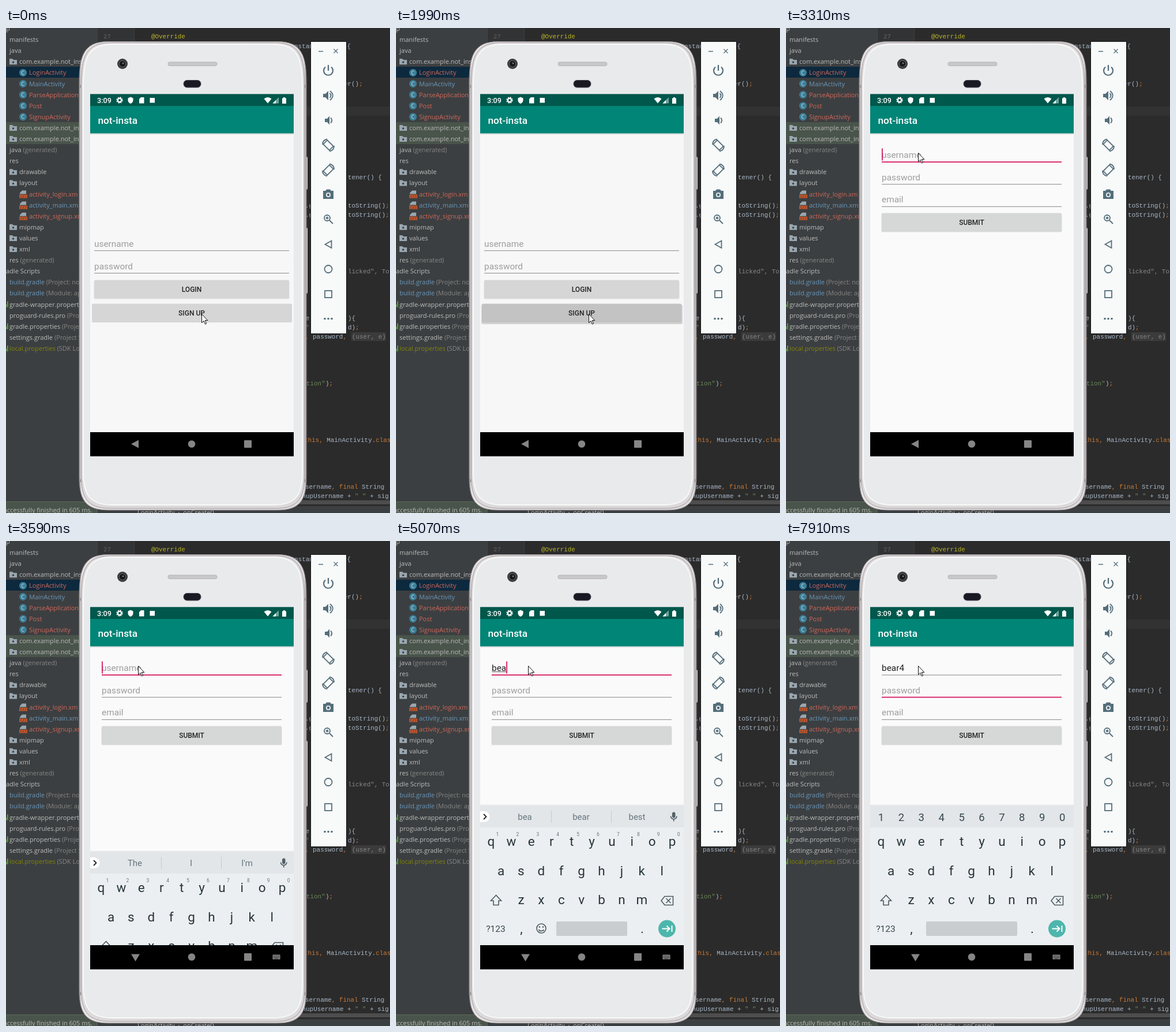
Recreate the animation shown at these times as an HTML page. Size 666 px wide and 840 px high, loop 8 s.

```html
<!DOCTYPE html>
<html lang="en">
<head>
<meta charset="utf-8">
<title>Sign-up demo</title>
<style>
html, body { margin: 0; width: 100%; height: 100%; overflow: hidden; background: #2b2b2b; }
svg { display: block; }
text { white-space: pre; }
#tree, .ide { font: 11px "Open Sans", "Noto Sans", sans-serif; fill: #bbb; }
#code { font: 10.9px "Liberation Mono", monospace; fill: #a9b7c6; }
.key { fill: #cc7832; } .str { fill: #6a8759; } .gray { fill: #868686; }
.red { fill: #d1675a; } .blue { fill: #6897bb; } .olive { fill: #848504; }
.app { font-family: Roboto, sans-serif; }
.title { font-size: 17.2px; font-weight: 500; fill: #fff; }
.edit { font-size: 15.4px; fill: #212121; }
.hint { font-size: 15.4px; fill: #9d9d9d; }
.btn { font-size: 12px; font-weight: 500; fill: #222; text-anchor: middle; }
.line { fill: #9a9a9a; }
.pink { fill: #d81b60; }
.c { text-anchor: middle; }
.letter { font-size: 22.5px; fill: #26343b; }
.digit { font-size: 18.5px; fill: #37474f; }
.mini { font-size: 8.5px; fill: #66757d; }
.word { font-size: 15px; fill: #66757d; }
.tool { fill: none; stroke: #546e7a; stroke-width: 1.8; }
.solid { fill: #546e7a; }
.ink { fill: none; stroke: #4b5a62; stroke-width: 1.6; }
</style>
</head>
<body>
<svg width="666" height="840" viewBox="0 0 666 840">
  <defs>
    <clipPath id="screenClip"><rect x="146" y="114.5" width="353" height="627"/></clipPath>
    <clipPath id="reveal"><rect id="edge" x="146" y="114" width="353" height="640"/></clipPath>
    <clipPath id="boardClip"><rect x="146" y="440" width="353" height="260"/></clipPath>
    <g id="chrome">
      <rect x="146" y="114" width="353" height="21" fill="#00574b"/>
      <rect x="146" y="135" width="353" height="47.500" fill="#008577"/>
      <rect x="146" y="182.500" width="353" height="2" fill="#000" opacity=".1"/>
      <text class="app title" x="159.500" y="165.500">not-insta</text>
      <rect x="146" y="700" width="353" height="60"/>
    </g>
    <linearGradient id="rim">
      <stop offset="0" stop-color="#aaa4a6"/><stop offset=".01" stop-color="#e6e3e4"/>
      <stop offset=".99" stop-color="#dedbdc"/><stop offset="1" stop-color="#9b9597"/>
    </linearGradient>
  </defs>

  <!-- editor behind the phone -->
  <rect width="158" height="840" fill="#3c3f41"/>
  <rect x="158" width="64" height="840" fill="#313335"/>
  <path d="M158.500 0V840M222.500 0V840" stroke="#4a4c4e" opacity=".6"/>
  <rect x="222" y="136" width="444" height="16" fill="#323232"/>
  <rect x="599" y="527" width="60" height="15" fill="#3b3b3b"/>
  <g id="tree"></g>
  <g id="code"></g>
  <rect x="222" y="818" width="444" height="7" fill="#4d4d4d"/>
  <rect x="158" y="828" width="508" height="12" fill="#3c3f41"/>
  <text class="ide" x="228" y="843">LoginActivity  ›  onCreate()</text>
  <rect x="-2" y="820.500" width="160" height="24" fill="#49544a" stroke="#5d6a5c"/>
  <text class="ide" x="-5" y="839">uccessfully finished in 605 ms.</text>

  <!-- phone body -->
  <rect x="518" y="223" width="5" height="57" rx="2" fill="#dedede"/>
  <rect x="518" y="346" width="5" height="114" rx="2" fill="#dedede"/>
  <path id="shell" fill="url(#rim)" stroke="#8f898b"/>
  <path d="M127 101h8M513 101h8M127 784h8M513 784h8" stroke="#a09a9c" stroke-width="5"/>
  <path id="band" fill="#dcd9da" stroke="#a39b9e"/>
  <path id="face" fill="#e9eaec" stroke="#f9f9f9" stroke-width="2"/>
  <circle cx="202" cy="62" r="9" fill="#3b3b3d"/>
  <circle cx="202" cy="62" r="5.500" fill="#17171a" stroke="#66666a"/>
  <circle cx="203" cy="61" r="1.500" fill="#777d88"/>
  <rect x="281" y="59" width="85" height="6.500" rx="3" fill="#c8c8ca" stroke="#aaa" stroke-width=".7"/>
  <rect x="308" y="90.500" width="30" height="12.500" rx="6" fill="#191923" stroke="#4c4c58"/>

  <!-- phone screen -->
  <g clip-path="url(#screenClip)" class="app">
    <rect x="146" y="114" width="353" height="628"/>
    <g id="login">
      <rect x="146" y="114" width="353" height="626" fill="#f7f7f7"/>
      <use href="#chrome"/>
      <text class="hint" x="153" y="379">username</text>
      <rect class="line" x="153" y="385" width="338" height="1.200"/>
      <text class="hint" x="153" y="417.500">password</text>
      <rect class="line" x="153" y="424" width="338" height="1.200"/>
      <rect x="152.500" y="438" width="339" height="31.500" rx="2" fill="#000" opacity=".1"/>
      <rect x="153" y="436.500" width="338" height="31.500" rx="2" fill="#d6d6d6"/>
      <text class="btn" x="322" y="456.500">LOGIN</text>
      <rect id="pressShade" x="148" y="479" width="349" height="34" rx="3" fill="#000" opacity=".15"/>
      <rect id="signUp" x="149" y="477.500" width="347" height="32.500" rx="2"/>
      <text class="btn" x="322" y="497.500">SIGN UP</text>
      <rect id="dim" x="146" y="114" width="353" height="640"/>
    </g>
    <g id="signupClip" clip-path="url(#reveal)"><g id="signup">
      <rect x="146" y="114" width="353" height="626" fill="#fafafa"/>
      <use href="#chrome"/>
      <text id="nameHint" class="hint" x="166" y="225">username</text>
      <text id="name" class="edit" x="166" y="225"></text>
      <rect id="compose" x="166.500" y="226" height="1" fill="#555"/>
      <rect id="nameLine" x="166" width="312"/>
      <text class="hint" x="166" y="263.500">password</text>
      <rect id="passLine" x="166" width="312"/>
      <text class="hint" x="166" y="302">email</text>
      <rect class="line" x="166" y="308.800" width="312" height="1.200"/>
      <rect x="165.500" y="322" width="313" height="31.500" rx="2" fill="#000" opacity=".13"/>
      <rect x="166" y="320.500" width="312" height="31.500" rx="2" fill="#d6d7d7"/>
      <text class="btn" x="322" y="341">SUBMIT</text>
      <rect id="caret" class="pink" width="1.800" height="21"/>
    </g></g>

    <g clip-path="url(#boardClip)"><g id="board">
      <rect x="146" y="456.500" width="353" height="2" fill="#000" opacity=".06"/>
      <rect x="146" y="458" width="353" height="243" fill="#eceff1"/>
      <rect x="146" y="458" width="353" height="38" fill="#e2e6e9"/>
      <g id="letters"></g>
      <path class="ink" d="M173.500 613.500L164.500 623H169V630.500H178V623H182.500Z"/>
      <path class="ink" d="M466 615.500H480.500V630.500H466L460 623ZM468.500 619l8 8m0-8l-8 8"/>
      <text class="c" x="173" y="677" font-size="15.500" fill="#37474f">?123</text>
      <text class="c letter" x="217.500" y="679">,</text>
      <text class="c letter" x="427" y="679">.</text>
      <rect id="space" y="659" height="25" rx="2" fill="#c9cdd0"/>
      <circle cx="470" cy="671.500" r="15" fill="#4db6ac"/>
      <path d="M461.500 671.500H474M469.500 666.500l5 5-5 5M478.500 666V677" fill="none" stroke="#fff" stroke-width="2"/>
      <g id="words">
        <path d="M146 468H153a9.500 9.500 0 0 1 0 19H146Z" fill="#fff"/>
        <path d="M152 473l4.500 4.500-4.500 4.500" fill="none" stroke="#222" stroke-width="1.800"/>
        <path d="M269.500 467V488M373.500 467V488" stroke="#c3c9cc"/>
        <text class="c word" x="223.500" y="483"></text>
        <text class="c word" x="321" y="483"></text>
        <text class="c word" x="418" y="483"></text>
        <rect x="479" y="469.500" width="5.500" height="10" rx="2.700" fill="#546067"/>
        <path class="ink" d="M476.500 476.500a5.200 5.200 0 0 0 10.400 0M481.700 482V485.500"/>
        <circle class="ink" cx="252" cy="671" r="8"/>
        <path class="ink" d="M247.500 673a5 4.500 0 0 0 9 0"/>
        <circle cx="249" cy="668.500" r="1.300" fill="#4b5a62"/><circle cx="255" cy="668.500" r="1.300" fill="#4b5a62"/>
        <g id="minis"></g>
      </g>
      <g id="digits"></g>
    </g></g>

    <!-- system icons -->
    <text x="158" y="129.500" font-size="12.600" font-weight="500" fill="#fff">3:09</text>
    <circle cx="197" cy="125" r="3.200" fill="none" stroke="#fff" stroke-width="2.200"/>
    <circle cx="197" cy="125" r="4.900" fill="none" stroke="#fff" stroke-width="1.600" stroke-dasharray="2.200 1.650"/>
    <path d="M216 119.500l4.500 2V125q0 4-4.500 6-4.500-2-4.500-6V121.500ZM234 120h5.500v10.500h-8.500V123Z" fill="#fff"/>
    <rect x="249.500" y="121" width="8.500" height="8.500" fill="#fff"/>
    <path d="M447.500 122.500q6.500-5 13 0L454 130.500ZM486 121.500V131H479V121.500H481V120H484V121.500Z" fill="#fff"/>
    <path d="M473 120V130.500H462.500Z" fill="#fff" opacity=".45"/>
    <path d="M468 125V130.500H462.500Z" fill="#fff"/>
    <path id="back" fill="#858585"/>
    <circle cx="322" cy="720.500" r="6.300" fill="#858585"/>
    <rect x="413" y="714" width="13" height="13" rx="1" fill="#858585"/>
    <g id="boardIcon">
      <rect x="462.500" y="716.500" width="13" height="8" fill="#858585"/>
      <path d="M464 719h10M464 721.300h10M466 723.300h6" stroke="#000" stroke-dasharray="1.200 1"/>
    </g>
  </g>

  <!-- emulator toolbar -->
  <rect x="528.500" y="23.500" width="62" height="506" fill="#f8f9f9" stroke="#151515"/>
  <g class="tool">
    <path d="M542 40.500H550M568.500 36.500l7 7m0-7l-7 7" stroke-width="1.300"/>
    <path d="M554 67.500a8 8 0 1 0 10 0M559 64V74" stroke-width="2.200"/>
    <path d="M561.500 113q4 4 0 8M562 109q9.500 8 0 16"/>
    <path d="M563 155.500q4.500 4.500 0 9"/>
    <g id="turn">
      <rect x="551.500" y="198" width="15" height="10" transform="rotate(45 559 203)"/>
      <path d="M549 202q0-8 8-9.500M569 204q0 8-8 9.500"/>
    </g>
    <use href="#turn" transform="matrix(-1 0 0 1 1118 43)"/>
    <circle cx="557" cy="329" r="5"/>
    <path d="M561 333l6 6M554.500 329h5M557 326.500v5"/>
    <path d="M564.500 368.500V381L553.500 374.800Z"/>
    <circle cx="559" cy="417.500" r="6.500"/>
    <rect x="553" y="455" width="12" height="12"/>
  </g>
  <g class="solid">
    <path d="M550 114h4l5-5v16l-5-5h-4ZM553 157h4l4-4.500v15l-4-4.500h-4Z"/>
    <path d="M550 282h4l2-2.500h6l2 2.500h4v14h-18Z"/>
    <circle cx="559" cy="289" r="4" fill="#f8f9f9"/><circle cx="559" cy="289" r="2.400"/>
    <circle cx="553" cy="503.500" r="1.800"/><circle cx="559" cy="503.500" r="1.800"/><circle cx="565" cy="503.500" r="1.800"/>
  </g>

  <path id="mouse" d="M.5.5V15.500L4 12.300 6.500 18 8.600 17 6.200 11.500H10.800Z" fill="#fff" stroke="#111"/>
</svg>

<script>
const $ = id => document.getElementById(id);
const LOOP = 8000;
const set = (id, attrs) => { for (const k in attrs) $(id).setAttribute(k, attrs[k]); };

// phone outline with soft, squarish corners
const outline = (l, t, r, b) =>
  `M${l} ${t + 72}C${l} ${t + 26} ${l + 7} ${t} ${l + 50} ${t}H${r - 50}C${r - 7} ${t} ${r} ${t + 26} ${r} ${t + 72}` +
  `V${b - 58}C${r} ${b - 20} ${r - 9} ${b} ${r - 50} ${b}H${l + 50}C${l + 9} ${b} ${l} ${b - 20} ${l} ${b - 58}Z`;
set('shell', { d: outline(127, 23.5, 521, 835) });
set('band', { d: outline(130.5, 25.5, 517.5, 832) });
set('face', { d: outline(134, 28, 514, 826) });

// project tree: x, label, colour, grey suffix, icon
const rows = [
  [0, 'p'], [6, 'manifests'], [6, 'java'],
  [23, 'com.example.not_insta', '', '', 'folder'],
  [40, 'LoginActivity', 'red', '', 'class'], [40, 'MainActivity', 'blue', '', 'class'],
  [40, 'ParseApplication', 'red', '', 'class'], [40, 'Post', 'red', '', 'class'],
  [40, 'SignupActivity', 'red', '', 'class'],
  [23, 'com.example.not_in', '', '', 'folder'], [23, 'com.example.not_in', '', '', 'folder'],
  [6, 'java', '', ' (generated)'], [6, 'res'],
  [23, 'drawable', '', '', 'folder'], [23, 'layout', '', '', 'folder'],
  [40, 'activity_login.xm', 'red', '', 'xml'], [40, 'activity_main.xm', 'blue', '', 'xml'],
  [40, 'activity_signup.xm', 'red', '', 'xml'],
  [23, 'mipmap', '', '', 'folder'], [23, 'values', '', '', 'folder'], [23, 'xml', '', '', 'folder'],
  [6, 'res', '', ' (generated)'], [0, 'adle Scripts'],
  [6, 'build.gradle', 'blue', ' (Project: no'], [6, 'build.gradle', 'blue', ' (Module: ap'],
  [6, 'gradle-wrapper.properti', '', '', 'bar'], [6, 'proguard-rules.pro', '', ' (Pro'],
  [6, 'gradle.properties', '', ' (Projec', 'bar'], [6, 'settings.gradle', '', ' (Project S'],
  [6, 'local.properties', 'olive', ' (SDK Lo', 'bar']
];
const icons = {
  folder: '<path d="M6-5h5l2 2h6V5H6Z" fill="#9aa7b0"/><circle cx="12.500" cy="1" r="1.700" fill="#3c3f41"/>',
  class: '<circle cx="29.500" r="6.500" fill="#3d7f98"/><text x="26.200" y="3.500" font-size="9" fill="#d5e4ea">C</text>',
  xml: '<path d="M28-6h7V0H24V-2Z" fill="#9aa7b0"/><path d="M23 1H37V7H23Z" fill="#c4572b"/>' +
    '<path d="M27 2l-2 2 2 2M33 2l2 2-2 2M31 2l-2 4" fill="none" stroke="#3c3f41"/>',
  bar: '<path d="M0 0h1v5h-1ZM2-5h1.500V5h-1.500Z" fill="#62b543"/>'
};
$('tree').innerHTML =
  '<rect y="67" width="158" height="19" fill="#0d293e"/><rect y="163" width="158" height="38" fill="#49544a"/>' +
  rows.map(([x, label, color = '', note = '', icon], i) =>
    `<g transform="translate(0 ${(1 + i * 19.1).toFixed(1)})">${icons[icon] || ''}` +
    `<text x="${x}" y="4" class="${color}">${label}<tspan class="gray">${note}</tspan></text></g>`).join('');

const paint = s => s.replace(/"[^"]*"?|[;,]|\b(final|this|class)\b/g,
  m => `<tspan class="${m[0] === '"' ? 'str' : 'key'}">${m}</tspan>`);
const code = [
  [487, 31, 'dInstanceState) {'], [586, 96, 'er();'], [593, 258, 'tener() {'],
  [519, 307, '.getText().'], [593, 307, 'toString();'], [519, 323, '.getText().'], [593, 323, 'toString();'],
  [513, 502, 'ne'], [593, 502, '){'], [519, 518, '"'], [593, 518, 'd);'], [519, 534, ', password,'],
  [554, 615, ');'], [517, 713, 'this, MainActivity.class'],
  [519, 794, 'sername, final String'], [507, 810, 'gnupUsername + " " + sig']
];
$('code').innerHTML = code.map(([x, y, s]) => `<text x="${x}" y="${y + 4}">${paint(s)}</text>`).join('') +
  '<text x="169" y="18" fill="#606366">27</text><text x="252" y="18" fill="#bbb529">@Override</text>' +
  '<text class="gray" x="593" y="425">licked", To</text><text class="gray" x="600" y="538">(user, e)</text>' +
  '<text class="str" x="521" y="619">tion"</text>';

// keyboard
const keyRow = (chars, x, y, cls) => [...chars].map((ch, i) =>
  `<text class="c ${cls}" x="${(x + i * 34.9).toFixed(1)}" y="${y}">${ch}</text>`).join('');
$('letters').innerHTML = keyRow('qwertyuiop', 165, 528, 'letter') +
  keyRow('asdfghjkl', 182, 579, 'letter') + keyRow('zxcvbnm', 217, 629, 'letter');
$('minis').innerHTML = keyRow('1234567890', 176, 511, 'mini');
$('digits').innerHTML = keyRow('1234567890', 165, 484.5, 'digit');

// timelines: [start ms, value...]
const mouse = [[0, 339, 495], [120, 336, 495], [240, 334, 495], [2410, 329, 487], [2560, 314, 452],
  [2680, 306, 424], [2830, 284, 358], [2950, 260, 298], [3070, 240, 246], [3190, 230, 218], [3310, 229, 216]];
const slide = [[0, 0, 0, 26, 760], [2410, 4, .05, 21, 420], [2560, 8, .12, 9, 172], [2680, 8, .12, 1, 114], [2830, 8, .12, 0, 114]];
const typing = [[0, '', 'The', 'I', "I'm"], [4240, 'b', 'b', 'be', 'I'], [4670, 'be', 'be', 'bed', 'bet'],
  [5070, 'bea', 'bea', 'bear', 'best'], [5470, 'bear', 'bear', 'bearings', 'bears'], [6580, 'bear4', 'bear4', 'bear 4', 'bear']];
const blink = [[0, 0], [3310, 1], [5900, 0], [6430, 1], [6980, 0], [7500, 1], [7910, 0]];

const pick = (steps, t) => steps.filter(s => s[0] <= t).pop().slice(1);
const show = (id, on) => $(id).style.display = on ? '' : 'none';
const shift = (id, y, x = 0) => set(id, { transform: `translate(${x} ${y})` });
const underline = (id, y, active) => set(id, {
  class: active ? 'pink' : 'line', y: active ? y - .3 : y, height: active ? 1.8 : 1.2
});
const words = document.querySelectorAll('#words .word');

function draw(t) {
  const [mx, my] = pick(mouse, t);
  shift('mouse', my, mx);

  const pressed = t >= 1990;
  show('pressShade', pressed);
  set('signUp', { fill: pressed ? '#c3c3c3' : '#d6d6d6', width: pressed ? 346 : 347 });

  const [up, dim, down, edge] = pick(slide, t);
  shift('login', -up);
  set('dim', { opacity: dim });
  shift('signup', down);
  set('edge', { y: edge });
  show('signupClip', t >= 2410);

  const [typed, ...hints] = pick(typing, t);
  const onPass = t >= 7380;
  $('name').textContent = typed;
  const width = typed ? $('name').getComputedTextLength() : 0;
  show('nameHint', !typed);
  set('compose', { width: onPass ? 0 : width });
  underline('nameLine', 231.5, t >= 3310 && !onPass);
  underline('passLine', 270, onPass);
  show('caret', pick(blink, t)[0]);
  set('caret', { x: onPass ? 166 : 166 + width, y: onPass ? 247.5 : 208.5 });

  const boardUp = t >= 3590, numeric = t >= 7500;
  show('board', boardUp);
  shift('board', t < 3720 ? 80 : 0);
  show('words', !numeric);
  show('digits', numeric);
  set('space', numeric ? { x: 243, width: 158 } : { x: 278, width: 123 });
  words.forEach((w, i) => w.textContent = hints[i]);
  show('boardIcon', boardUp);
  set('back', { d: boardUp ? 'M217 715.500H232L224.500 728Z' : 'M230 713.500V727.500L217 720.500Z' });
}

const start = performance.now();
function tick() {
  draw((performance.now() - start) % LOOP);
  requestAnimationFrame(tick);
}
tick();
</script>
</body>
</html>
```
